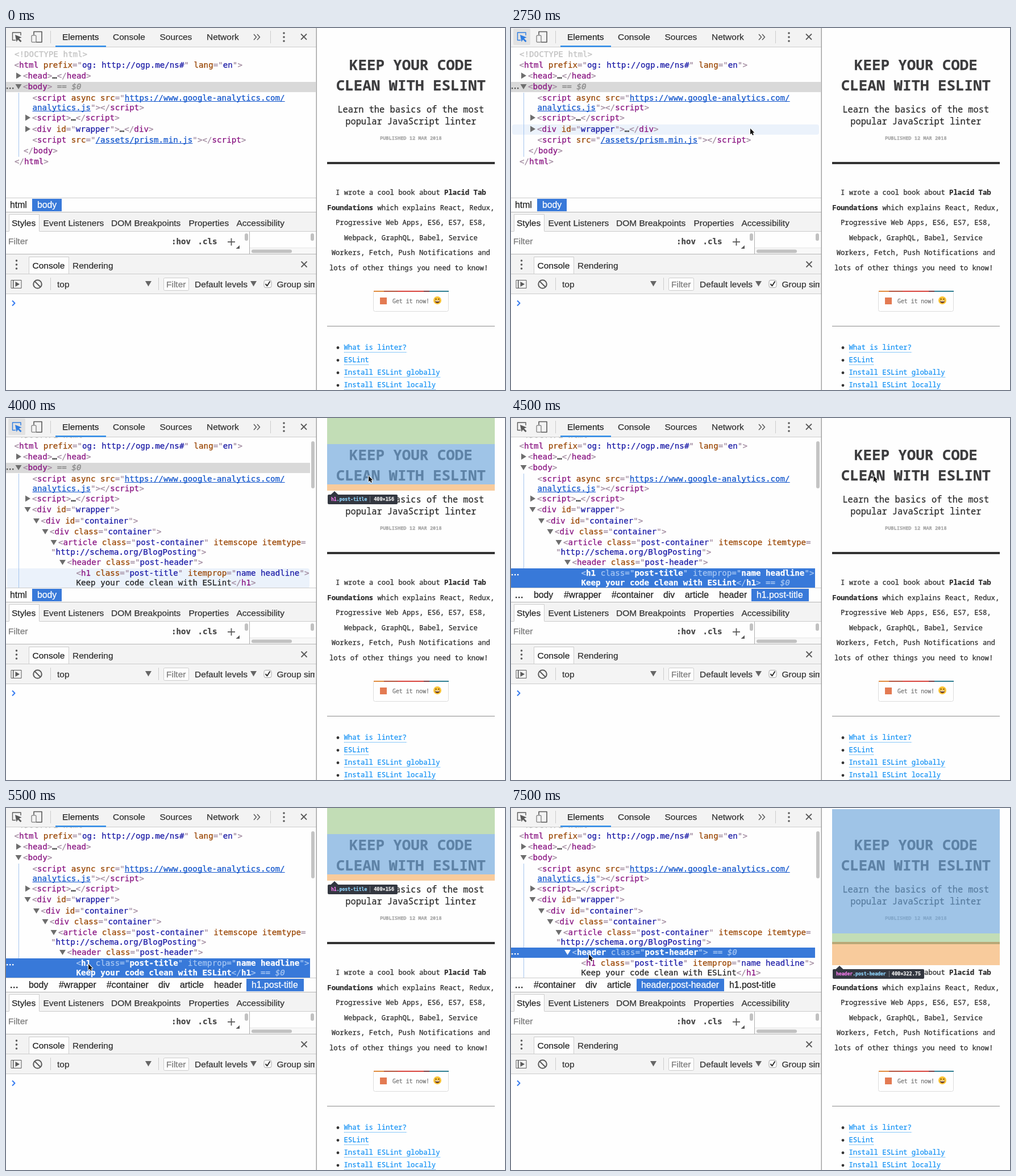
An HTML page with a canvas for the animation above (8000 ms loop, 878 by 638 pixels).

```html
<!DOCTYPE html>
<html lang="en">
<head>
<meta charset="utf-8">
<title>Inspecting elements</title>
<style>
  html, body { margin: 0; width: 100%; height: 100%; overflow: hidden; background: #fefefe; }
  canvas { display: block; }
</style>
</head>
<body>
<canvas id="stage" width="878" height="638"></canvas>
<script>
const ctx = document.getElementById('stage').getContext('2d');
const LOOP = 8000;
const CODE = '"DejaVu Sans Mono", monospace';
const PAGE = '"Noto Sans Mono", monospace';
const SANS = '"Liberation Sans", Arial, sans-serif';
const BLUE = '#3879d9', BAR = '#f3f3f3', LINE = '#cccccc', ICON = '#5a5a5a', WHITE = '#fefefe';

// ---------- drawing helpers ----------
function rect(x, y, w, h, color) {
  ctx.fillStyle = color;
  ctx.fillRect(x, y, w, h);
}
function box(x, y, w, h, radius, fill, stroke) {
  ctx.beginPath();
  ctx.roundRect(x, y, w, h, radius);
  if (fill) { ctx.fillStyle = fill; ctx.fill(); }
  if (stroke) { ctx.strokeStyle = stroke; ctx.lineWidth = 1; ctx.stroke(); }
}
function poly(points, fill) {
  ctx.beginPath();
  points.forEach(([x, y]) => ctx.lineTo(x, y));
  ctx.closePath();
  ctx.fillStyle = fill;
  ctx.fill();
}
function stroke(points, color, width = 1) {
  ctx.beginPath();
  points.forEach(([x, y], i) => i ? ctx.lineTo(x, y) : ctx.moveTo(x, y));
  ctx.strokeStyle = color;
  ctx.lineWidth = width;
  ctx.stroke();
}
function dot(x, y, r, color) {
  ctx.beginPath();
  ctx.arc(x, y, r, 0, Math.PI * 2);
  ctx.fillStyle = color;
  ctx.fill();
}
// The hairline outline gives the slightly heavier weight of smoothed type.
function text(str, x, y, font, color, align = 'left') {
  ctx.font = font;
  ctx.textAlign = align;
  ctx.fillStyle = ctx.strokeStyle = color;
  ctx.lineWidth = 0.25;
  ctx.fillText(str, x, y);
  ctx.strokeText(str, x, y);
}
const label = (str, x, y, color = '#333', size = 15.5) => text(str, x, y + 5, `${size}px ${SANS}`, color);
const cross = (x, y, r = 5) => {
  stroke([[x - r, y - r], [x + r, y + r]], ICON, 1.8);
  stroke([[x - r, y + r], [x + r, y - r]], ICON, 1.8);
};
const kebab = (x, y) => [-7, 0, 7].forEach(d => dot(x, y + d, 1.8, ICON));
const down = (x, y, w, h, color = '#666') => poly([[x, y], [x + w, y], [x + w / 2, y + h]], color);
const right = (x, y, color = '#666') => poly([[x, y], [x + 9, y + 5.5], [x, y + 11]], color);

// Markup: segments split by "|", each led by a one-letter style key.
function rich(markup, x, y, size, family, styles) {
  markup.split('|').slice(1).forEach(part => {
    const [color, face = '', underline] = styles[part[0]];
    const str = part.slice(1);
    text(str, x, y, `${face} ${size}px ${family}`, color);
    const w = ctx.measureText(str).width;
    if (underline) rect(x, Math.round(y) + 1, w, 1, color);
    x += w;
  });
}

// ---------- element tree ----------
const NORMAL = {
  p: ['#a18a9f'], t: ['#881280'], n: ['#994500'], v: ['#1a1aa6'], l: ['#1155cc', '', true],
  x: ['#222'], c: ['#c0c0c0'], e: ['#888'], i: ['#888', 'italic']
};
const PICKED = {
  p: ['#a9c8f3'], t: ['#fff', 'bold'], n: ['#a9c8f3'], v: ['#fff', 'bold'],
  x: ['#fff', 'bold'], e: ['#a9c8f3'], i: ['#a9c8f3', 'italic']
};
const attr = (name, value) => `|n ${name}|p="|v${value}|p"`;
const open = (tag, attrs = '') => `|p<|t${tag}${attrs}|p>`;
const close = tag => `|p</|t${tag}|p>`;
const folded = (tag, attrs) => open(tag, attrs) + '|x…' + close(tag);

// Row: id, text x, centre y, arrow, markup
const HEAD_ROWS = [
  ['doctype', 15, 46, '', '|c<!DOCTYPE html>'],
  ['html', 14.5, 65, '', open('html', attr('prefix', 'og: http://ogp.me/ns#') + attr('lang', 'en'))],
  ['head', 30, 84, '>', folded('head')],
  ['body', 30, 103, 'v', open('body')],
  ['async', 46.5, 123, '', '|p<|tscript|n async src|p="|lhttps://www.google-analytics.com/'],
  ['async', 46.5, 140, '', '|lanalytics.js|p">' + close('script')],
  ['script', 46, 158, '>', folded('script')]
];
const CLOSED_ROWS = [
  ['wrapper', 46, 178, '>', folded('div', attr('id', 'wrapper'))],
  ['prism', 46.5, 197, '', '|p<|tscript|n src|p="|l/assets/prism.min.js|p">' + close('script')],
  ['', 31, 216, '', close('body')],
  ['', 15, 235, '', close('html')]
];
const OPEN_ROWS = [
  ['wrapper', 46, 161, 'v', open('div', attr('id', 'wrapper'))],
  ['container', 61.5, 181, 'v', open('div', attr('id', 'container'))],
  ['inner', 77, 200, 'v', open('div', attr('class', 'container'))],
  ['article', 92, 219, 'v', '|p<|tarticle' + attr('class', 'post-container') + '|n itemscope itemtype|p='],
  ['article', 79, 236, '', '|p"|vhttp://schema.org/BlogPosting|p">'],
  ['header', 107.5, 254, 'v', open('header', attr('class', 'post-header'))],
  ['h1', 123.5, 273, '', open('h1', attr('class', 'post-title') + attr('itemprop', 'name headline'))],
  ['h1', 123.5, 290, '', '|xKeep your code clean with ESLint' + close('h1')]
];
const scrolledRows = HEAD_ROWS.map(([id, x, y, ...rest]) => [id, x, y - 16, ...rest]).concat(OPEN_ROWS);
const closedRows = HEAD_ROWS.concat(CLOSED_ROWS);

function drawTree({ scrolled, selected, hover }) {
  const rows = scrolled ? scrolledRows : closedRows;
  const span = id => {
    const ys = rows.filter(r => r[0] === id).map(r => r[2]);
    return [ys[0] - 8, ys[ys.length - 1] - ys[0] + 18];
  };
  ctx.save();
  ctx.beginPath();
  ctx.rect(0, 34, 545, 265);
  ctx.clip();
  const blue = selected !== 'body';
  if (hover && hover !== selected) {
    const [y, h] = span(hover);
    box(2, y, scrolled ? 532 : 540, h, 4, '#ebf2fb');
  }
  const [y, h] = span(selected);
  rect(0, y, scrolled ? 535 : 545, h, blue ? BLUE : '#d9d9d9');
  [2, 7, 12].forEach(x => rect(x - 1, y + 10, 2.4, 2.4, blue ? '#fff' : '#555'));
  rect(22, scrolled ? 98 : 114, 1, scrolled ? (selected === 'header' ? 148 : 167) : 113, '#a5c5ee');
  if (scrolled && selected !== 'h1') rect(22, 264, 1, 35, '#a5c5ee');

  const last = rows.reduce((found, r, i) => r[0] === selected ? i : found, -1);
  rows.forEach(([id, x, cy, arrow, markup], i) => {
    const picked = blue && id === selected;
    const tone = picked ? '#fff' : '#6e6e6e';
    if (arrow === '>') right(x - 12, cy - 5.5, tone);
    if (arrow === 'v') down(x - 13.5, cy - 4, 11, 9, tone);
    rich(markup + (i === last ? '|e ==|i $0' : ''), x, cy + 5, 14.2, CODE, picked ? PICKED : NORMAL);
  });
  if (scrolled) box(537, 41, 6, 83, 3, '#c4c4c4');
  ctx.restore();
}

const CRUMBS = {
  body: [['html', 7], ['body', 55, 46, 52]],
  h1: [['body', 40], ['#wrapper', 93], ['#container', 177], ['div', 268], ['article', 306],
       ['header', 366], ['h1.post-title', 432, 423, 101]],
  header: [['#container', 40], ['div', 131], ['article', 169], ['header.post-header', 229, 221, 154],
           ['h1.post-title', 384]]
};
function drawCrumbs(selected) {
  rect(0, 299, 546, 1, LINE);
  rect(0, 324, 546, 1, '#b5b5b5');
  if (selected !== 'body') [9, 14, 19].forEach(x => rect(x - 1, 315, 2.4, 2.4, '#333'));
  CRUMBS[selected].forEach(([name, x, left, width]) => {
    if (width) rect(left, 301, width, 22, BLUE);
    label(name, x, 312, width ? '#fff' : '#222', 15.8);
  });
}

// ---------- developer tools frame ----------
function drawToolbar(active) {
  rect(0, 0, 546, 33, BAR);
  rect(0, 33, 546, 1, LINE);
  if (active) box(4, 1, 30, 29, 2, '#e2e2e2');
  const tone = active ? '#2f7de1' : ICON;
  stroke([[17, 21.5], [11.5, 21.5], [11.5, 8], [26, 8], [26, 13]], tone, 1.4);
  poly([[16, 12], [27.5, 16.5], [23, 18.5], [27.5, 23], [25.5, 25], [21, 20.5], [18.5, 24.5]], tone);
  stroke([[49, 12], [49, 6.5], [63, 6.5], [63, 25], [53, 25]], ICON, 1.6);
  box(45, 13, 8, 12, 1, BAR, ICON);
  rect(78, 5, 1, 22, LINE);
  rect(87, 31, 89, 2.5, '#2d8ceb');
  label('Elements', 99, 16, '#222');
  label('Console', 188, 16);
  label('Sources', 270.5, 16);
  label('Network', 353, 16);
  [436, 442].forEach(x => stroke([[x, 11], [x + 4.5, 16], [x, 21]], ICON, 1.5));
  rect(465, 5, 1, 22, LINE);
  kebab(489, 16);
  cross(524, 15.5);
}

function drawLowerPanels() {
  rect(0, 325, 546, 33, BAR);
  rect(0, 358, 546, 1, LINE);
  box(5.5, 328.5, 53, 31, 0, WHITE);
  stroke([[5.5, 358], [5.5, 328.5], [58.5, 328.5], [58.5, 358]], LINE);
  label('Styles', 10, 344, '#222');
  label('Event Listeners', 65.5, 344);
  label('DOM Breakpoints', 185, 344);
  label('Properties', 321.5, 344);
  label('Accessibility', 405.5, 344);

  label('Filter', 4, 376, '#777');
  text(':hov', 291, 381, `bold 14.2px ${CODE}`, '#444');
  text('.cls', 337.5, 381, `bold 14.2px ${CODE}`, '#444');
  stroke([[390, 377], [403, 377]], ICON, 1.8);
  stroke([[396.5, 370.5], [396.5, 383.5]], ICON, 1.8);
  poly([[411, 383], [411, 389], [404.5, 389]], ICON);
  rect(428, 359, 1, 39, '#b0b0b0');
  rect(429, 388, 117, 10, '#f8f8f8');
  rect(429, 387, 117, 1, '#e6e6e6');
  box(420, 362, 6, 13, 3, '#c1c1c1');
  box(536, 362, 6, 13, 3, '#c1c1c1');
  box(432, 390.5, 71, 6, 3, '#c1c1c1');

  rect(0, 398, 546, 1, '#b5b5b5');
  rect(0, 399, 546, 34, BAR);
  rect(0, 433, 546, 1, LINE);
  kebab(18.5, 417);
  rect(41, 403, 69, 30, WHITE);
  stroke([[40.5, 433], [40.5, 403.5], [110.5, 403.5], [110.5, 433]], LINE);
  label('Console', 46.5, 419, '#222');
  label('Rendering', 117, 419);
  cross(524.5, 416.5);

  rect(0, 434, 546, 34, '#f4f4f4');
  rect(0, 468, 546, 1, LINE);
  box(9, 444.5, 18, 14, 0, null, ICON);
  rect(12, 444, 1.5, 15, ICON);
  poly([[16.5, 447], [24, 451.5], [16.5, 456]], ICON);
  ctx.beginPath();
  ctx.arc(55.5, 451.5, 7.3, 0, Math.PI * 2);
  ctx.strokeStyle = ICON;
  ctx.lineWidth = 2;
  ctx.stroke();
  stroke([[50.5, 446.5], [60.5, 456.5]], ICON, 2);
  rect(78, 440, 1, 22, LINE);
  label('top', 90, 452);
  down(245, 446, 11, 9.5);
  rect(268, 440, 1, 22, LINE);
  box(277.5, 440.5, 44, 22, 2, WHITE, LINE);
  label('Filter', 282, 452, '#777');
  label('Default levels', 332, 452);
  down(430, 446, 11, 9.5);
  box(454, 444.5, 13, 13, 3, '#fff', '#a5a5a5');
  stroke([[456.5, 451], [459.5, 454.5], [464.5, 446.5]], '#333', 2);
  ctx.save();
  ctx.beginPath();
  ctx.rect(470, 440, 73, 25);
  ctx.clip();
  label('Group similar', 476.5, 452);
  ctx.restore();
  stroke([[11, 480.5], [15.5, 485], [11, 489.5]], '#367cf1', 2);
}

// ---------- web page ----------
const PROSE = { a: ['#2b2b2b'], b: ['#2b2b2b', 'bold'] };
const COPY = [
  '|aI wrote a cool book about |bPlacid Tab',
  '|bFoundations|a which explains React, Redux,',
  '|aProgressive Web Apps, ES6, ES7, ES8,',
  '|aWebpack, GraphQL, Babel, Service',
  '|aWorkers, Fetch, Push Notifications and',
  '|alots of other things you need to know! '
];
const LINKS = ['What is linter?', 'ESLint', 'Install ESLint globally', 'Install ESLint locally'];
const STRIPE = [['#e08a3c', 18], ['#b5533c', 24], ['#d8433b', 46], ['#7d3c42', 10], ['#2f7f93', 34]];

function drawPage() {
  const mid = 712.3;
  const title = `bold 25.8px ${PAGE}`, lead = `15.35px ${PAGE}`;
  text('KEEP YOUR CODE', mid, 74, title, '#3c3c3e', 'center');
  text('CLEAN WITH ESLINT', mid, 109.5, title, '#3c3c3e', 'center');
  text('Learn the basics of the most', mid, 149, lead, '#2b2b2b', 'center');
  text('popular JavaScript linter', mid, 169.5, lead, '#2b2b2b', 'center');
  text('PUBLISHED 12 MAR 2018', mid, 196.5, `bold 8.65px ${PAGE}`, '#a8a8a8', 'center');
  rect(565, 236, 295, 4, '#333');

  COPY.forEach((line, i) => {
    ctx.font = `12.25px ${PAGE}`;
    const w = ctx.measureText(line.replace(/\|./g, '')).width;
    rich(line, mid - w / 2, 294 + i * 26.5, 12.25, PAGE, PROSE);
  });

  box(646.5, 463.5, 132, 36, 3, WHITE, '#dcdcdc');
  let x = 647;
  STRIPE.forEach(([color, w]) => { rect(x, 463, w, 2, color); x += w; });
  rect(658, 475, 12, 12, '#e37a52');
  text('Get it now!', 680, 484.5, `9.85px ${PAGE}`, '#777');
  dot(759, 480, 7, '#fbc334');
  [756.5, 761.5].forEach(ex => dot(ex, 477.8, 1.1, '#5a3a18'));
  ctx.beginPath();
  ctx.arc(759, 480.5, 4.3, 0, Math.PI);
  ctx.fillStyle = '#6b3b1c';
  ctx.fill();
  rect(755.5, 480.5, 7, 1.4, '#fff');

  rect(565, 525, 295, 1, '#8c8c8c');
  LINKS.forEach((name, i) => {
    const y = 562 + i * 22.1;
    dot(584, y + 1.5, 2.4, '#333');
    text(name, 594.5, y + 4.5, `12.25px ${PAGE}`, '#1492f5');
    const w = ctx.measureText(name).width;
    ctx.setLineDash([1, 1]);
    stroke([[595, Math.round(y) + 9.5], [595 + w, Math.round(y) + 9.5]], '#1492f5');
    ctx.setLineDash([]);
  });
}

const CONTENT = 'rgba(111,168,220,.66)', PADDING = 'rgba(147,196,125,.55)';
const BORDER = 'rgba(255,229,153,.66)', MARGIN = 'rgba(246,178,107,.66)';
const OVERLAYS = {
  h1: { bands: [[0, 46, PADDING], [46, 117, CONTENT], [117, 128, MARGIN]],
        tip: 135, width: 124, name: ['h1', '.post-title'], size: '400×156' },
  header: { bands: [[2, 221, CONTENT], [221, 236, PADDING], [236, 240, BORDER], [240, 277, MARGIN]],
            tip: 284, width: 162, name: ['header', '.post-header'], size: '400×322.75' }
};
const TIP = { t: ['#ee78e6', 'bold'], c: ['#8ed3fb', 'bold'] };
function drawOverlay(id) {
  const { bands, tip, width, name, size } = OVERLAYS[id];
  bands.forEach(([top, bottom, color]) => rect(565, top, 295, bottom - top, color));
  box(566, tip, width - 1, 17, 2, '#333740');
  poly([[571, tip + 0.5], [578, tip - 6], [585, tip + 0.5]], '#333740');
  rich(`|t${name[0]}|c${name[1]}`, 572, tip + 11, 8.1, CODE, TIP);
  rect(565 + width - (id === 'h1' ? 49 : 62), tip + 3, 1, 11, '#777b84');
  text(size, 565 + width - 6, tip + 11, `bold 8.5px ${CODE}`, '#eee', 'right');
}

// ---------- timeline ----------
// Start time, pointer x and y, hovered row
const POINTER = [
  [250, 357, 57], [500, 235, 46], [750, 110, 30], [1000, 6, 14], [1250, 18, 24],
  [2000, 40, 34], [2250, 120, 78, 'head'], [2500, 280, 138, 'async'], [2750, 421, 177, 'wrapper'],
  [3000, 574, 160], [3250, 625, 114, 'h1'], [3500, 638, 102, 'h1'],
  [4750, 575, 124], [5000, 390, 196, 'inner'], [5250, 190, 268, 'h1'], [5500, 145, 275, 'h1'],
  [5750, 141, 262, 'header'], [6000, 137, 258, 'header']
];
const ARROW = [[0, 0], [0, 10.5], [2.4, 8.4], [4, 12], [5.9, 11.2], [4.4, 7.6], [7.4, 7.4]];

function stateAt(t) {
  return {
    pointer: POINTER.filter(p => p[0] <= t).pop(),
    active: t >= 1500 && t < 4250,
    scrolled: t >= 3250,
    selected: t < 4250 ? 'body' : t < 6750 ? 'h1' : 'header',
    overlay: t >= 5750 ? 'header' : t >= 5250 || (t >= 3750 && t < 4500) ? 'h1' : null
  };
}

function drawPointer(x, y) {
  const points = ARROW.map(([dx, dy]) => [x + dx, y + dy]);
  stroke([...points, points[0]], '#fff', 2);
  poly(points, '#111');
}

function render(t) {
  const state = stateAt(t);
  state.hover = state.pointer && state.pointer[3];
  rect(0, 0, 878, 638, WHITE);
  drawTree(state);
  drawToolbar(state.active);
  drawCrumbs(state.selected);
  drawLowerPanels();
  drawPage();
  rect(545.5, 0, 1.5, 638, '#a3a3a3');
  if (state.overlay) drawOverlay(state.overlay);
  if (state.pointer) drawPointer(state.pointer[1], state.pointer[2]);
}

ctx.lineJoin = 'round';
const start = performance.now();
function tick() {
  render((performance.now() - start) % LOOP);
  requestAnimationFrame(tick);
}
tick();
</script>
</body>
</html>
```
